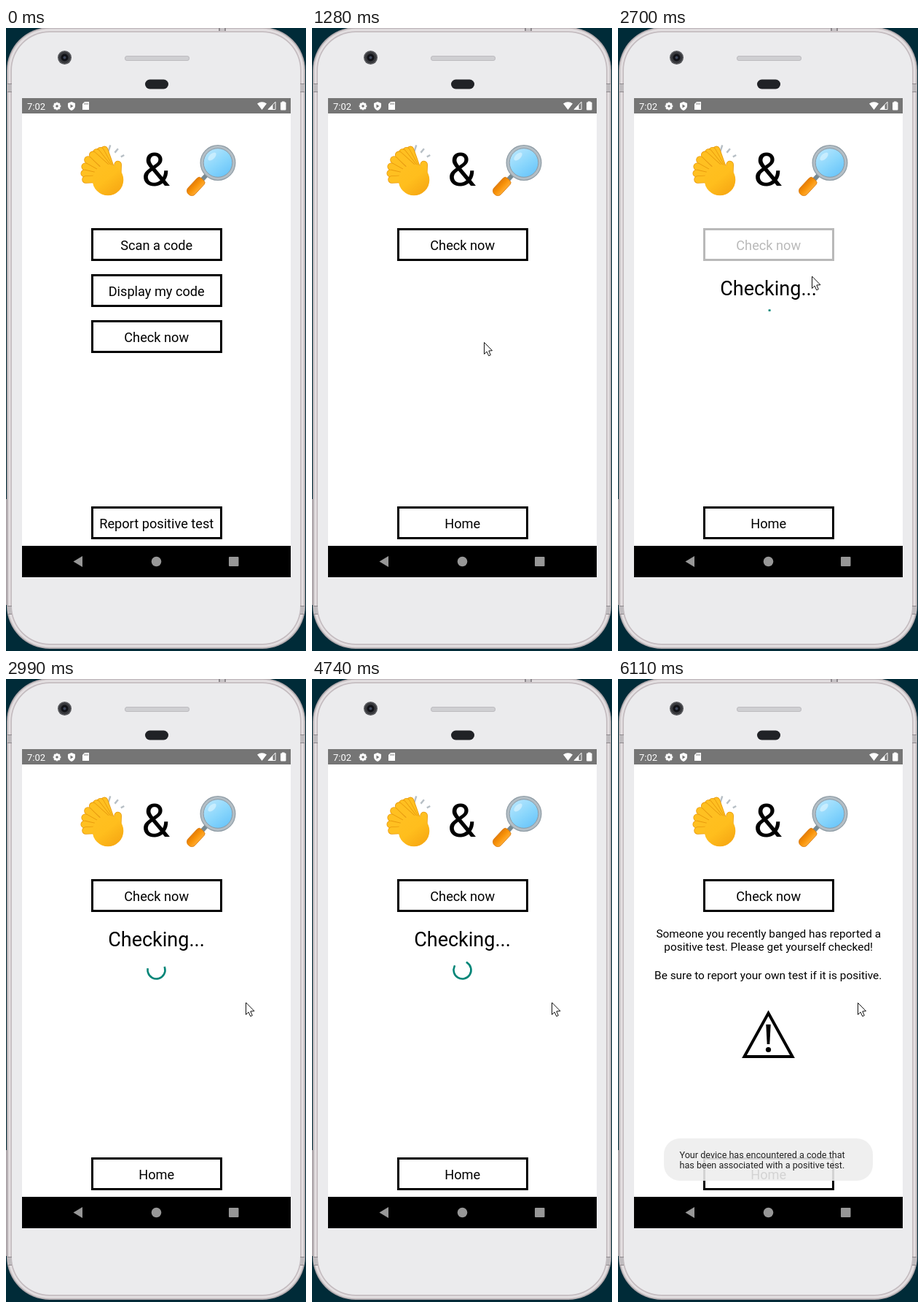
An HTML page with a canvas that plays this animation: 412x853 px, repeating every 8000 ms.

```html
<!DOCTYPE html>
<html lang="en">
<head>
<meta charset="utf-8">
<title>Check now</title>
<style>
  html, body { margin: 0; width: 100%; height: 100%; overflow: hidden; background: #002b38; }
  canvas { display: block; width: 412px; height: 853px; }
</style>
</head>
<body>
<canvas id="stage"></canvas>
<script>
const W = 412, H = 853, LOOP = 8000, MID = 206.5;
const SWITCH = 1240, SPIN = 2672, RESULT = 5690;
const DEG = Math.PI / 180;
const canvas = document.getElementById('stage');
const dpr = window.devicePixelRatio || 1;
canvas.width = W * dpr;
canvas.height = H * dpr;
const g = canvas.getContext('2d');

const mix = (a, b, u) => a + (b - a) * u;
const linear = (t, from, to) => Math.max(0, Math.min(1, (t - from) / (to - from)));
const smooth = (t, from, to) => {
  const u = linear(t, from, to);
  return u * u * (3 - 2 * u);
};

function paint(fill, stroke, width = 1) {
  if (fill) { g.fillStyle = fill; g.fill(); }
  if (stroke) { g.strokeStyle = stroke; g.lineWidth = width; g.stroke(); }
}

function rect(x, y, w, h, fill) {
  g.fillStyle = fill;
  g.fillRect(x, y, w, h);
}

function rounded(x, y, w, h, r, ...look) {
  g.beginPath();
  g.roundRect(x, y, w, h, r);
  paint(...look);
}

function disc(x, y, r, ...look) {
  g.beginPath();
  g.arc(x, y, r, 0, 2 * Math.PI);
  paint(...look);
}

function shape(path, ...look) {
  g.lineJoin = 'miter';
  const p = new Path2D(path);
  if (look[0]) { g.fillStyle = look[0]; g.fill(p); }
  if (look[1]) { g.strokeStyle = look[1]; g.lineWidth = look[2] || 1; g.stroke(p); }
}

// line of a given length from a point, at an angle in degrees
function ray(x, y, angle, from, to, color, width, cap = 'round') {
  const c = Math.cos(angle * DEG), s = Math.sin(angle * DEG);
  g.beginPath();
  g.moveTo(x + c * from, y + s * from);
  g.lineTo(x + c * to, y + s * to);
  g.lineCap = cap;
  paint(null, color, width);
}

function label(text, x, y, size, color = '#000', align = 'center') {
  g.font = size + 'px Roboto, sans-serif';
  g.textAlign = align;
  g.fillStyle = color;
  g.fillText(text, x, y);
}

function shade(x1, y1, x2, y2, ...colors) {
  const grad = g.createLinearGradient(x1, y1, x2, y2);
  colors.forEach((c, i) => grad.addColorStop(i / (colors.length - 1), c));
  return grad;
}

function drawPhone() {
  rect(0, 0, W, H, '#002b38');
  rect(0, 645, 2, 145, '#a9a3a7');
  const rims = ['#b3abaf', '#dcd7d9', '#e6e2e4', '#c4bcc0', '#ebebed'];
  rims.forEach((color, i) => {
    const inset = 1 + i * 1.75;
    rounded(inset, inset - 2, W - 2 * inset, 853 - 2 * inset, 60 - inset, color);
  });
  for (const y of [76, 791]) {
    for (const x of [2, 404]) {
      rect(x, y, 6, 12, '#8f8a8e');
      rect(x, y + 1, 6, 10, '#c0bcbf');
    }
  }
  rect(292, 0, 10, 4, '#8f8a8e');
  rect(294, 0, 6, 4, '#c6c2c5');

  disc(80.5, 40.5, 9.5, '#55565a');
  disc(80.5, 40.5, 7.8, '#36373b');
  disc(80.5, 40.5, 5, '#101116');
  disc(80.5, 40.5, 2, '#3c4558');
  rounded(163.5, 38.5, 88, 6, 2.5, '#cfcfd2', '#bdbcc0');
  rounded(191, 70.5, 32, 13, 6.5, '#202226');
}

function drawStatus() {
  const gray = '#757575', white = '#fff';
  rect(22, 96, 369, 21, gray);
  label('7:02', 29, 112, 13, white, 'left');

  // gear
  for (let a = 0; a < 360; a += 45) ray(70, 107, a, 0, 5.3, white, 2.6, 'butt');
  disc(70, 107, 4.2, white);
  disc(70, 107, 1.8, gray);

  // shield, memory card
  shape('M90 101l5 2v4q-.5 4-5 6q-4.500-2-5-6v-4z', white);
  shape('M88.500 104.500l4 2.500l-4 2.500z', gray);
  shape('M108 101h6v11h-9v-8z', white);
  for (let x = 108; x <= 112; x += 2) rect(x - 0.4, 102.5, 0.9, 2.5, gray);

  // wifi, signal, battery
  shape('M351.500 112l-6.500-8.400q6.500-4.800 13 0z', white);
  shape('M370 101.200v10.300h-10z', null, white);
  shape('M366.500 105v6.500h-6.500z', white);
  rect(379, 100.5, 3.5, 2, white);
  rounded(377, 101.5, 7.5, 11, 1, white);
}

function drawNav() {
  const gray = '#979797';
  rect(22, 709, 369, 43, '#000');
  shape('M92.500 730.500l12.500-7.500v15z', gray);
  disc(MID, 730.5, 6.8, gray);
  rounded(306, 724, 13.5, 13, 1, gray);
}

function finger(x, y, angle, length) {
  ray(x, y, angle, 0, length, '#e8990c', 10.6);
  ray(x, y, angle, 0, length, '#ffc021', 9);
}

function drawClap() {
  for (let i = 0; i < 3; i++) ray(134, 189, 288 + i * 22, 21 + i * 3, 30 + i, '#b7bfc5', 2.4, 'butt');
  for (let i = 3; i >= 0; i--) finger(146, 198, 222 + i * 9.5, 36 - i);
  finger(153, 206, 272, 19);
  for (let i = 0; i < 4; i++) finger(138, 206, 225 - i * 16, 36 - i * 2.5);
  disc(140, 208, 21.3, shade(120, 190, 150, 229, '#ffc021', '#ffbe1d', '#f7a813'));
}

function drawLens() {
  ray(291, 184.5, 133, 23, 34, '#788990', 6, 'butt');
  g.save();
  g.translate(291, 184.5);
  g.rotate(133 * DEG);
  rounded(31, -6.5, 28, 13, [4, 6, 6, 4], shade(0, -7, 0, 7, '#ffad36', '#f99409', '#e27a08'), '#d9790c', 0.8);
  g.restore();

  disc(291, 184.5, 24.5, '#8d9aa3');
  disc(291, 184.5, 23.4, '#b3bec5');
  disc(291, 184.5, 19.8, shade(280, 168, 303, 201, '#b0e3fd', '#8bd7fc', '#6cc6fa'), '#8c9ba6', 1);
  g.beginPath();
  g.ellipse(283, 176, 7, 3.6, -0.75, 0, 2 * Math.PI);
  paint('rgba(225,246,255,.6)');
}

function button(text, y, alpha = 1) {
  g.globalAlpha = alpha;
  g.lineJoin = 'miter';
  g.strokeStyle = '#000';
  g.lineWidth = 3;
  g.strokeRect(118.5, y + 1.5, 177, 42);
  label(text, 206.7, y + 30, 18.2);
  g.globalAlpha = 1;
}

// height at x of a cubic from (x0, 0) to (x3, 1) with flat ends
function flatCurve(x, x0, x1, x2, x3) {
  let lo = 0, hi = 1;
  for (let i = 0; i < 20; i++) {
    const u = (lo + hi) / 2, v = 1 - u;
    const at = v * v * v * x0 + 3 * u * v * v * x1 + 3 * u * u * v * x2 + u * u * u * x3;
    if (at < x) lo = u; else hi = u;
  }
  return lo * lo * (3 - 2 * lo);
}

function drawSpinner(age) {
  const p = age % 1333 / 1333;
  const turn = age / 2222 + p * 0.25 - 0.25;
  const from = 0.75 * flatCurve(p, 0.5, 0.7, 0.6, 1);
  const to = Math.max(from + 0.005, 0.75 * flatCurve(p, 0, 0.2, 0.1, 0.5));
  g.beginPath();
  g.arc(MID, 398.5, 12, (from + turn) * 360 * DEG, (to + turn) * 360 * DEG);
  g.lineCap = 'square';
  paint(null, '#008577', 2.6);
}

function drawResult() {
  label('Someone you recently banged has reported a', 206.7, 354, 15.4);
  label('positive test. Please get yourself checked!', 206.7, 372, 15.4);
  label('Be sure to report your own test if it is positive.', 206.2, 411, 15.4);
  shape('M206.500 457.500l33 59.500h-66z', null, '#000', 4);
  shape('M203.300 473h6.400l-1.400 27h-3.600z', '#000');
  disc(MID, 507.5, 3.6, '#000');
}

function drawToast(alpha) {
  g.globalAlpha = alpha * 0.89;
  rounded(63, 629, 287, 58, 22, '#eeeeee');
  g.globalAlpha = alpha;
  label('Your device has encountered a code that', 84.5, 656, 12.6, '#222', 'left');
  label('has been associated with a positive test.', 84.5, 670, 12.6, '#222', 'left');
  g.globalAlpha = 1;
}

// the pointer glides in, up to the button, then aside
function drawPointer(t) {
  if (t <= 290) return;
  const enter = smooth(t, 290, 1000), rise = smooth(t, 1940, 2420), leave = smooth(t, 2652, 2802);
  const x = mix(383, 236, enter) + 9 * rise + 84 * leave;
  const y = mix(853, 430, enter) - 124 * rise + 137 * leave;
  g.save();
  g.translate(Math.round(x) + 0.5, Math.round(y) + 0.5);
  shape('M0 0v16l3.600-3.400l2.600 5.700l2.600-1.100l-2.500-5.700l4.700-.3z', '#fff', '#111');
  g.restore();
}

function drawHome(t) {
  button('Scan a code', 274);
  button('Display my code', 337);
  button('Check now', 400, 1 - 0.8 * smooth(t, 1100, 1250));
  button('Report positive test', 655);
}

function drawCheck(t) {
  const press = smooth(t, 2500, 2640) - smooth(t, 2655, 2900);
  button('Check now', 274, 1 - 0.8 * press);
  button('Home', 655);
  if (t >= RESULT) {
    drawResult();
    drawToast(linear(t, RESULT, RESULT + 340));
  } else if (t >= SPIN) {
    label('Checking...', MID, 366, 27);
    drawSpinner(t - SPIN);
  }
}

function draw(t) {
  g.setTransform(dpr, 0, 0, dpr, 0, 0);
  drawPhone();
  rect(22, 96, 369, 656, '#fff');
  drawStatus();
  drawClap();
  label('&', 205.5, 216, 63);
  drawLens();
  if (t < SWITCH) drawHome(t); else drawCheck(t);
  drawNav();
  drawPointer(t);
}

const begin = performance.now();
function frame() {
  draw((performance.now() - begin) % LOOP);
  requestAnimationFrame(frame);
}
frame();
</script>
</body>
</html>
```
